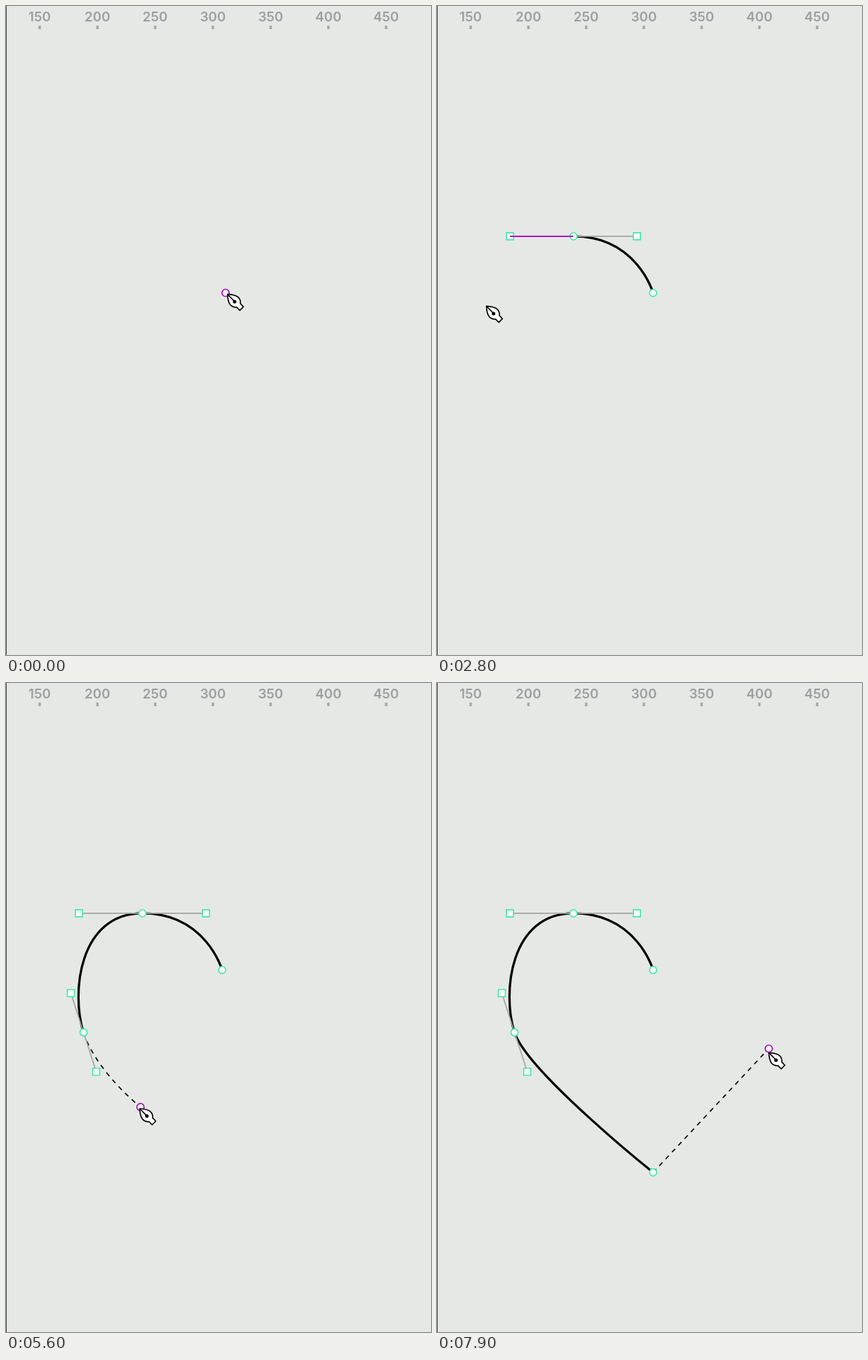
Write an HTML page with a canvas that moves like this. It is 606 px wide and 924 px high and loops after 8 s.

```html
<!DOCTYPE html>
<html lang="en">
<head>
<meta charset="utf-8">
<title>Pen tool</title>
<style>
  html, body { margin: 0; width: 100%; height: 100%; overflow: hidden; background: #e6e8e5; }
  canvas { display: block; width: 606px; height: 924px; }
</style>
</head>
<body>
<canvas width="606" height="924"></canvas>
<script>
const LOOP = 8000, STEP = 100, UNIT = 1.6467;
const GREEN = '#3fe9b0', PURPLE = '#ad00c4', GRAY = '#a3a4a3';
const ctx = document.querySelector('canvas').getContext('2d');

// Ruler units to stage pixels; the top of the drawn shape is y = 0.
const place = (x, y) => [48 + (x - 150) * UNIT, 327.9 + y * UNIT];
const A = place(308, 49), B = place(239, 0), C = place(188, 103), D = place(308, 224);

const add = (p, q, sign = 1) => [p[0] + sign * q[0], p[1] + sign * q[1]];
const mix = (p, q, k) => [p[0] + (q[0] - p[0]) * k, p[1] + (q[1] - p[1]) * k];
const within = (t, from, to) => t >= from && t < to;

function ease(t, from, to) {
  const k = Math.min(1, Math.max(0, (t - from) / (to - from)));
  return k * k * (3 - 2 * k);
}

// The point about to be placed sits beside the pen unless a move names where it ends.
const beside = pen => add(pen, [-2.7, -2]);
const REST = [315.8, 410.4];
const MOVES = [
  { from: 0, to: 100, pen: [314.6, 411] },
  { from: 600, to: 1600, pen: [188.3, 330], point: B },
  { from: 1600, to: 2300, pen: [106, 316.5] },
  { from: 2700, to: 2800, pen: [70.5, 427.4] },
  { from: 2800, to: 3200, pen: [96, 506] },
  { from: 3200, to: 3400, pen: [112.8, 500.2], point: [105.6, 484.3] },
  { from: 3600, to: 3800, pen: [113, 499.5], point: C },
  { from: 4000, to: 4100, pen: [119, 531] },
  { from: 4200, to: 4700, pen: [131.2, 555.2] },
  { from: 5200, to: 6200, pen: [300.2, 699.5], point: D },
  { from: 7300, to: 7900, pen: [473.2, 526.4], point: [473, 520.6] }
];

const penAt = t => MOVES.reduce((p, m) => mix(p, m.pen, ease(t, m.from, m.to)), REST);
const pointAt = t => MOVES.reduce(
  (p, m) => mix(p, m.point || beside(m.pen), ease(t, m.from, m.to)), beside(REST));

// Handles follow the pen while it drags.
const handleB = t => [penAt(Math.min(t, 2300))[0] - 2 - B[0], 0];
const handleC = t => t < 4800
  ? [0, Math.max(0, penAt(t)[1] - 11.3 - C[1])]
  : [11 * UNIT, 34 * UNIT];

function stroke(path, color, width, dash = []) {
  ctx.strokeStyle = color;
  ctx.lineWidth = width;
  ctx.setLineDash(dash);
  ctx.stroke(path);
}

function line(p, q, color) {
  const path = new Path2D();
  path.moveTo(...p);
  path.lineTo(...q);
  stroke(path, color, UNIT);
}

function curve(from, c1, c2, to, dashed) {
  const path = new Path2D();
  path.moveTo(...from);
  path.bezierCurveTo(...c1, ...c2, ...to);
  if (dashed) stroke(path, '#000', UNIT, [4 * UNIT, 4 * UNIT]);
  else stroke(path, '#000', 2 * UNIT);
}

function marker(path, color) {
  ctx.fillStyle = '#fff';
  ctx.fill(path);
  stroke(path, color, UNIT);
}

function anchor([x, y], color = GREEN) {
  const path = new Path2D();
  path.arc(x, y, 5.1, 0, 2 * Math.PI);
  marker(path, color);
}

function handles(p, h) {
  if (!h[0] && !h[1]) return;
  const ends = [add(p, h), add(p, h, -1)];
  line(...ends, GRAY);
  for (const [x, y] of ends) {
    const path = new Path2D();
    path.rect(x - 5, y - 5, 10, 10);
    marker(path, GREEN);
  }
}

const nib = new Path2D(
  'M0 0C7 .3 12 1.2 15.4 4.3C18.2 7 18.9 9.6 18.4 13.2L22.8 17.8L17.6 23' +
  'L13.1 18.5C9.6 18.9 7 18.2 4.3 15.4C1.2 12 .3 7 0 0Z');
const slit = new Path2D('M0 0L10.2 10.4');
const hole = new Path2D('M12.7 10.6a2.5 2.5 0 1 1-5 0a2.5 2.5 0 1 1 5 0Z');

function pen([x, y]) {
  ctx.save();
  ctx.translate(x, y);
  ctx.lineJoin = 'round';
  marker(nib, '#000');
  stroke(slit, '#000', 1.5);
  ctx.fillStyle = '#000';
  ctx.fill(hole);
  ctx.restore();
}

function ruler() {
  ctx.font = '600 18.8px Inter, sans-serif';
  ctx.textAlign = 'center';
  for (let mark = 150; mark <= 450; mark += 50) {
    const [x] = place(mark, 0);
    ctx.fillStyle = '#9c9ea2';
    ctx.fillText(mark, x, 21.5);
    ctx.fillStyle = '#a5a7a8';
    ctx.fillRect(x - 1.7, 28, 3.4, 5);
  }
}

function draw(t) {
  ctx.fillStyle = '#e6e8e5';
  ctx.fillRect(0, 0, 606, 924);
  ctx.fillStyle = '#444';
  ctx.fillRect(0, 0, 1, 924);
  ruler();

  const hB = handleB(t), hC = handleC(t), point = pointAt(t);
  const start = t < 700 ? point : A;
  const placed = [500, 1700, 4000, 7300].filter(time => t >= time).length;
  const anchors = [start, B, C, D].slice(0, placed);
  const out = [start, add(B, hB), add(C, hC), D];
  const aiming = t < 500 || within(t, 700, 1700) || within(t, 2900, 4000) ||
    within(t, 5300, 7300) || t >= 7400;

  if (placed > 1) curve(A, A, add(B, hB, -1), B);
  if (placed > 2) curve(B, out[1], add(C, hC, -1), C);
  if (placed > 3) curve(C, out[2], D, D);
  if (aiming && placed) curve(anchors[placed - 1], out[placed - 1], point, point, true);

  if (placed > 1) handles(B, hB);
  if (placed > 2) handles(C, hC);
  anchors.forEach(p => anchor(p));
  if (aiming) anchor(point, PURPLE);

  // Snapping guides
  if (within(t, 1700, 2900)) line(B, out[1], PURPLE);
  if (within(t, 4100, 4800)) line(C, out[2], PURPLE);
  if (within(t, 6200, 7300)) line(A, D, PURPLE);

  pen(penAt(t));
}

const origin = performance.now();
function tick() {
  const t = (performance.now() - origin) % LOOP;
  draw(Math.floor(t / STEP) * STEP);
  requestAnimationFrame(tick);
}
tick();
</script>
</body>
</html>
```
